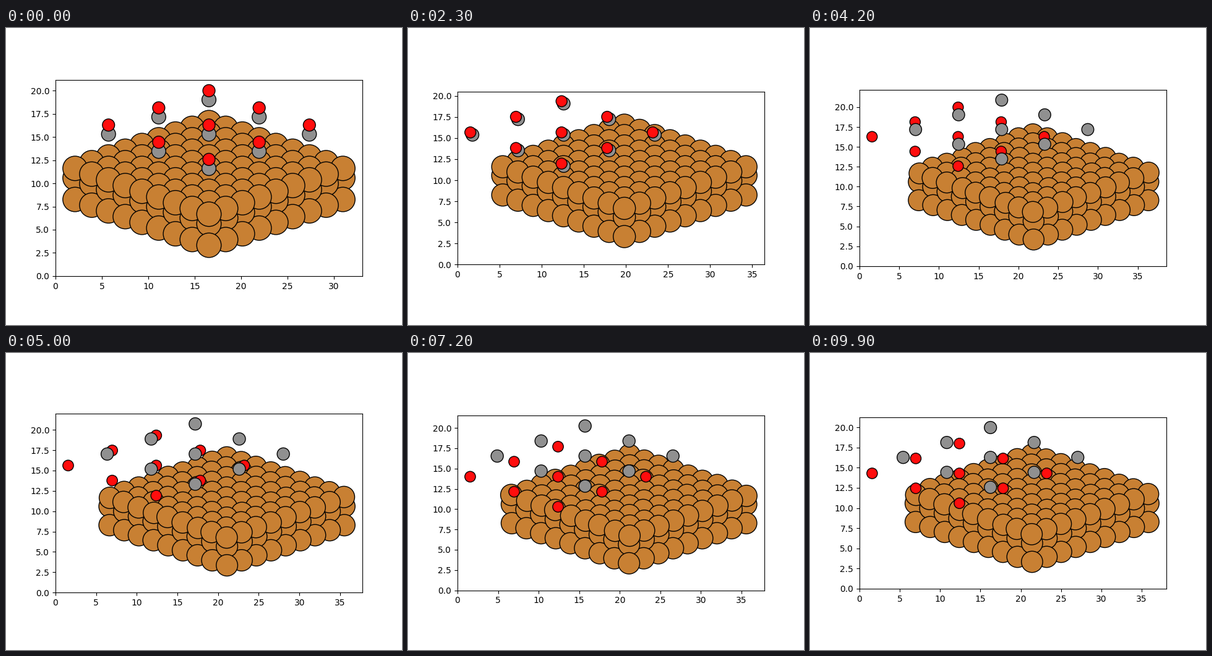
A matplotlib script for the animation above (10 s loop, 640 by 480 pixels).

```python
import numpy as np
import matplotlib.pyplot as plt
from matplotlib.animation import FuncAnimation
from matplotlib.patches import Circle

FRAMES, INTERVAL = 100, 100
STEP = 3.61 / 2                      # half the cubic lattice constant
TILT = np.radians(20)
SIN, COS = np.sin(TILT), np.cos(TILT)
N = 9                                # atoms along each slab edge
FLOOR = -3 * COS                     # the view starts 3 units below the slab
BREAK = 31                           # frame at which the C-O bond is broken
R_CU, R_C, R_O = 1.32, 0.76, 0.66
COPPER, GREY, RED = (0.784, 0.502, 0.2), (0.565,) * 3, (1.0, 0.051, 0.051)

# key points (time, x, y) of the nearest molecule, seen from the front atom
CARBON = [(0, 0, 8.28), (15, -4.74, 7.97), (BREAK, -8.08, 9.05),
          (42, -4.01, 10.13), (59, -4.95, 9.5), (84, -5.54, 9.56),
          (99, -5.16, 9.25)]
OXYGEN = [(0, 0, 9.26), (15, -5.16, 8.72), (BREAK, -9.65, 8.83),
          (36, -11.1, 9.08), (42, -9.49, 9.23), (59, -8.69, 7.52),
          (84, -8.96, 6.9), (99, -9.01, 7.27)]


def make_path(keys):
    """Smooth curve through the keys, at rest at both ends."""
    keys = np.array(keys, float)
    times, points = keys[:, 0], keys[:, 1:]
    slopes = np.gradient(points, times, axis=0)
    slopes[[0, -1]] = 0

    def at(t):
        k = min(np.searchsorted(times, t, side="right"), len(times) - 1) - 1
        span = times[k + 1] - times[k]
        u = (t - times[k]) / span
        return ((1 + 2 * u) * (1 - u) ** 2 * points[k]
                + u * (1 - u) ** 2 * span * slopes[k]
                + u * u * (3 - 2 * u) * points[k + 1]
                + u * u * (u - 1) * span * slopes[k + 1])
    return at


def build_slab():
    """Projected positions, depth and top-layer site of every copper atom."""
    layer, i, j = (a.ravel() for a in np.indices((3, N, N)))
    height = layer * STEP
    back = (i + j + layer % 2) * STEP
    xy = np.column_stack([(j - i) * STEP, back * SIN + height * COS])
    site = np.where(layer == 2, 3 * (i % 3) + j % 3, -1)
    return xy, height * SIN - back * COS, site


slab, depth, site = build_slab()
top = site >= 0
row, col = (a.ravel() for a in np.indices((3, 3)))
grid = 3 * STEP * np.column_stack([col - row, (row + col) * SIN])
radii = np.repeat([R_CU, R_C, R_O], [len(slab), 9, 9])
carbon_at, oxygen_at = make_path(CARBON), make_path(OXYGEN)
phase = np.random.default_rng(4).uniform(0, 2 * np.pi, (9, 2))

fig, ax = plt.subplots(figsize=(6.4, 4.8), dpi=100)
ax.set_aspect("equal")


def add_atoms(count, radius, color):
    return [ax.add_patch(Circle((0, 0), radius, facecolor=color,
                                edgecolor="black")) for _ in range(count)]


atoms = (add_atoms(len(slab), R_CU, COPPER) + add_atoms(9, R_C, GREY)
         + add_atoms(9, R_O, RED))
for rank, k in enumerate(np.argsort(depth, kind="stable")):
    atoms[k].set_zorder(1 + rank / 1000)


def surface_shift(frame):
    """The top layer starts pressed in, then rises and sways per site."""
    loose = np.clip((frame - BREAK) / 11, 0, 1)
    sway = np.sin(phase + frame / 8) * (0.09, 0.06)
    return loose * sway + (0, 0.07 * loose - 0.04)


def update(frame):
    copper = slab.copy()
    copper[top] += surface_shift(frame)[site[top]]
    carbon, oxygen = grid + carbon_at(frame), grid + oxygen_at(frame)
    xy = np.vstack([copper, carbon, oxygen])

    # oxygen sits above its carbon until the bond breaks
    lift = 1.1 if frame < BREAK else 0
    near = np.concatenate([carbon[:, 1], oxygen[:, 1] - lift])
    for atom, y in zip(atoms[len(slab):], near):
        atom.set_zorder(1.9 - y / 100)

    low = (xy - radii[:, None]).min(axis=0)
    high = (xy + radii[:, None]).max(axis=0)
    low[1] = FLOOR
    size = high - low
    for atom, pos in zip(atoms, xy - low + 0.025 * size):
        atom.set_center(pos)
    ax.set_xlim(0, 1.05 * size[0])
    ax.set_ylim(0, 1.05 * size[1])
    return atoms


anim = FuncAnimation(fig, update, frames=FRAMES, interval=INTERVAL,
                     repeat=True, repeat_delay=0, blit=False)
plt.show()
```
